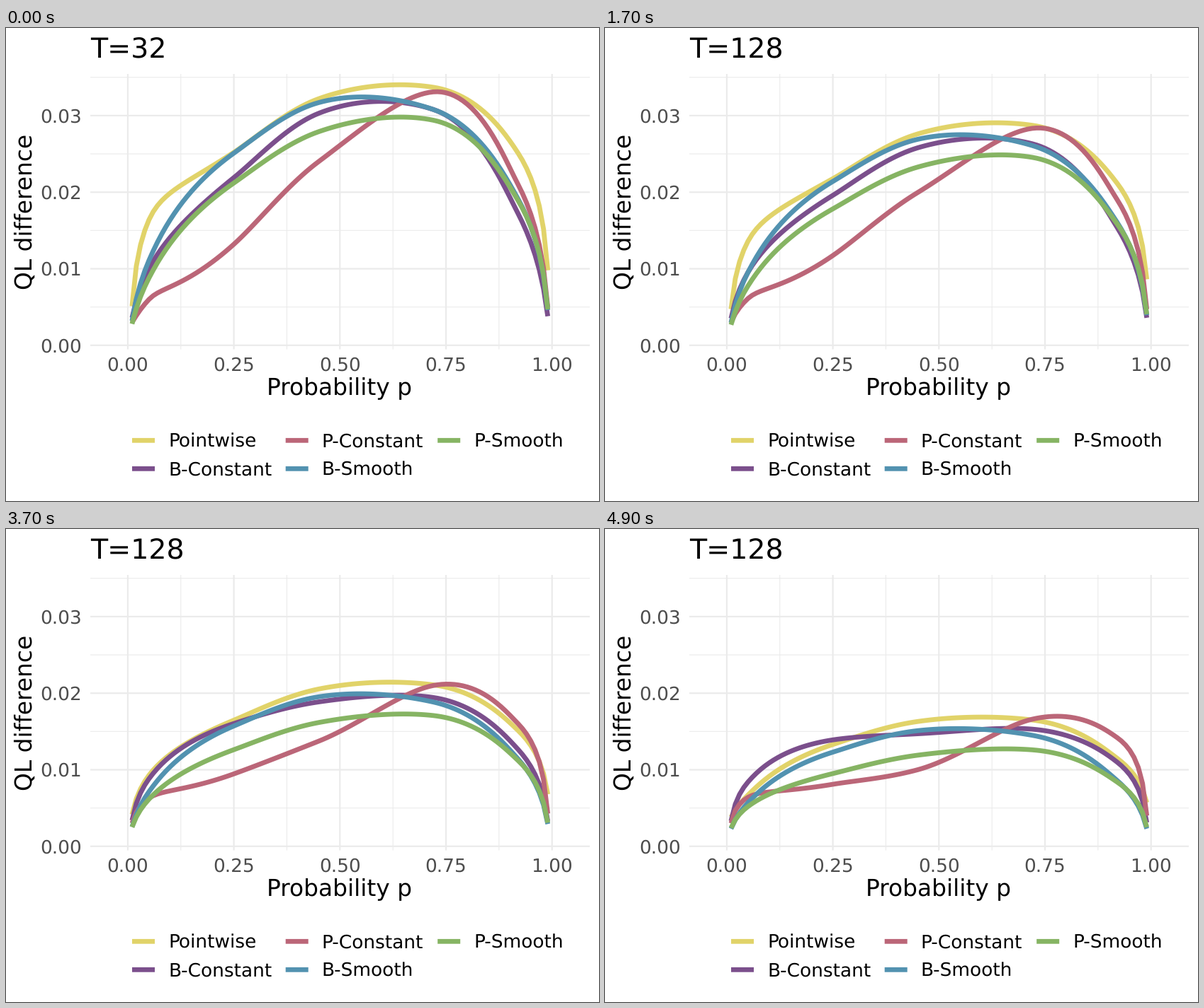
These frames come from a looping animation (837 by 669 pixels, 8000 ms). A matplotlib script:

```python
import numpy as np
import matplotlib.pyplot as plt
from matplotlib.animation import FuncAnimation

W, H, DPI = 837, 669, 64
PX = 72 / DPI  # points per pixel
FRAMES, INTERVAL = 80, 100
HOLD, STEPS = 4, 45  # still frames before the morph, length of the morph

LABEL = 32.9  # font sizes in pixels
TITLE, SMALL = 1.2 * LABEL, 0.8 * LABEL
LEFT, RIGHT, TOP, BOTTOM = 119, 824, 65, 454.5
GRID, GREY = "#ebebeb", "#4d4d4d"
MAJOR, MINOR, LINE = 2.2, 1.1, 6.8
LEGEND_X = 178, 394.7, 609.2

plt.rcParams["font.family"] = "DejaVu Sans"
plt.rcParams["text.hinting"] = "none"

PROBS = np.arange(1, 100) / 100
KEY_PROBS = np.array([.01, .05, .25, .45, .72, .92, .99])

# name: colour, heights at KEY_PROBS before and after, in thousandths
SERIES = {
    "Pointwise": ("#e1d369", (5.1, 16.4, 25.2, 32.2, 33.7, 25.1, 9.8),
                  (3.8, 6.7, 13.3, 16.3, 16.5, 11.5, 5.7)),
    "B-Constant": ("#7b4f8c", (3.6, 10, 21.9, 30.3, 30.8, 17.2, 3.8),
                   (3.3, 8.4, 13.9, 14.7, 15.3, 11, 3.1)),
    "P-Constant": ("#bb6678", (3, 6, 13.2, 24, 33.1, 21, 5),
                   (3, 6.4, 8.1, 10, 16.6, 14.2, 4)),
    "B-Smooth": ("#5292b0", (3.2, 11.1, 25.1, 31.7, 30.8, 19.1, 4.6),
                 (2.3, 5.7, 12.3, 15.1, 14.5, 8.6, 2.3)),
    "P-Smooth": ("#86b463", (2.8, 8.8, 21.2, 27.9, 29.4, 18.9, 4.7),
                 (2.4, 5.2, 9.5, 11.9, 12.6, 8.4, 2.5)),
}


def px(p):
    return 171.9 + 598.8 * p


def py(v):
    """Vertical pixel of a value given in thousandths."""
    return 448.8 - 10.83 * v


def logit(p):
    return np.log(p / (1 - p))


def smooth(heights):
    """Cubic Hermite curve over the log odds, which spreads the steep ends."""
    x, y = logit(KEY_PROBS), np.array(heights)
    slope = np.gradient(y, x, edge_order=2)
    i = np.clip(np.searchsorted(KEY_PROBS, PROBS, side="right") - 1,
                0, len(x) - 2)
    h = x[i + 1] - x[i]
    t = (logit(PROBS) - x[i]) / h
    return (y[i] * (1 + 2 * t) * (1 - t) ** 2
            + y[i + 1] * t * t * (3 - 2 * t)
            + h * slope[i] * t * (1 - t) ** 2
            + h * slope[i + 1] * t * t * (t - 1))


fig = plt.figure(figsize=(W / DPI, H / DPI), dpi=DPI, facecolor="white")
ax = fig.add_axes([0, 0, 1, 1])
ax.set_xlim(0, W)
ax.set_ylim(H, 0)
ax.axis("off")


def stroke(xs, ys, color, width, z=2):
    return ax.plot(xs, ys, color=color, lw=width * PX, zorder=z, snap=False,
                   solid_capstyle="butt", solid_joinstyle="round")[0]


def write(x, y, text, size, color="black", ha="left", **kw):
    return ax.text(x, y, text, fontsize=size * PX, color=color, ha=ha,
                   va="baseline", **kw)


def draw_grid():
    for k in range(8):
        y, major = py(5 * k), k % 2 == 0
        stroke([LEFT, RIGHT], [y, y], GRID, MAJOR if major else MINOR, 1)
        if major:
            write(106.6, y + 9.5, f"{k * 0.005:.2f}", SMALL, GREY, "right")
    for k in range(9):
        x, major = px(k / 8), k % 2 == 0
        stroke([x, x], [TOP, BOTTOM], GRID, MAJOR if major else MINOR, 1)
        if major:
            write(x, 484.5, f"{k / 8:.2f}", SMALL, GREY, "center")


def add_series(index, name, color, start, end):
    col, row = divmod(index, 2)
    x, y = LEGEND_X[col], 583.3 + 40 * row
    stroke([x, x + 32], [y, y], color, LINE)
    write(x + 51, y + 9.5, name, SMALL)
    start, end = smooth(start), smooth(end)
    return stroke(px(PROBS), py(start), color, LINE), start, end


draw_grid()
title = write(LEFT, 42, "T=32", TITLE)
write(470.8, 518.6, "Probability p", LABEL, ha="center")
write(37, 260, "QL difference", LABEL, ha="center",
      rotation=90, rotation_mode="anchor")
curves = [add_series(i, name, *spec)
          for i, (name, spec) in enumerate(SERIES.items())]


def update(frame):
    t = min(max(frame - HOLD, 0), STEPS) / STEPS
    title.set_text("T=128" if t > 0 else "T=32")
    for line, start, end in curves:
        line.set_ydata(py(start + (end - start) * t))
    return [title] + [c[0] for c in curves]


anim = FuncAnimation(fig, update, frames=FRAMES, interval=INTERVAL,
                     repeat=True, repeat_delay=0, blit=False)
plt.show()
```
